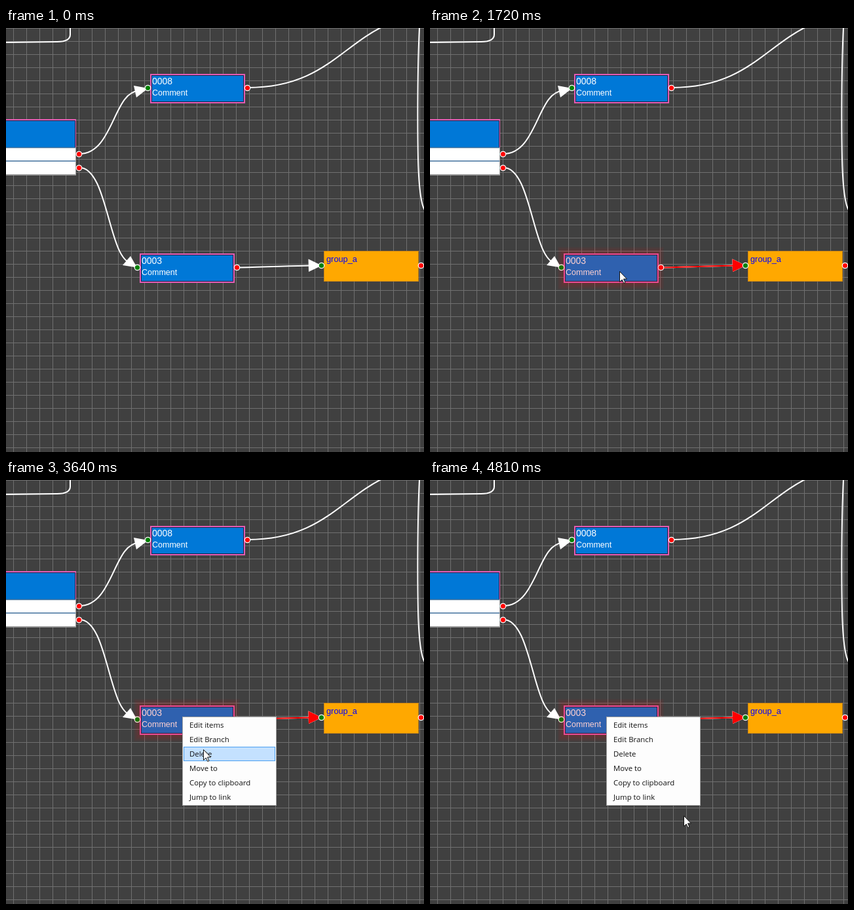
An HTML page that plays this animation: 638x647 px, repeating every 4890 ms.

```html
<!DOCTYPE html>
<html lang="en">
<head>
<meta charset="utf-8">
<title>Node editor context menu</title>
<style>
  html, body { margin: 0; width: 100%; height: 100%; overflow: hidden; background: #404040; }
  svg { display: block; width: 100vw; height: 100vh; }
  text { font-family: "Liberation Sans", sans-serif; font-size: 12.5px; fill: #fff; }
  .id { font-size: 14px; }
  .group { font-size: 12.8px; fill: #00f; }
  .menu text { font-family: "Open Sans", sans-serif; font-size: 11.4px; fill: #111; }
  .wire { fill: none; stroke: #fff; stroke-width: 2; }
  .head { fill: #fff; }
  .in, .out { stroke: #fff; stroke-width: 1.2; }
  .in { fill: #008000; }
  .out { fill: #f00; }
  .glow rect { fill: #f00; fill-opacity: .04; }
  .red .wire { stroke: #f00; }
  .red .head { fill: #f00; }

  .anim { animation: 4890ms step-end infinite; }
  .selection { animation-name: selection; }
  .menu { animation-name: menu; }
  .click { animation-name: click; }
  .hover { animation-name: hover; }
  .cursor { animation-name: cursor; }

  @keyframes selection { 0% { opacity: 0 } 35.17%, 100% { opacity: 1 } }
  @keyframes menu { 0% { opacity: 0 } 46.21%, 100% { opacity: 1 } }
  @keyframes click { 0% { opacity: 0 } 33.33% { opacity: 1 } 35.17%, 100% { opacity: 0 } }
  @keyframes hover {
    0%     { opacity: 0; transform: translate(0, 0) }
    71.16% { opacity: 1; transform: translate(0, 0) }
    72.8%  { opacity: 1; transform: translate(0, 22px) }
    74.43% { opacity: 1; transform: translate(0, 44px) }
    77.7%  { opacity: 1; transform: translate(0, 66px) }
    79.34% { opacity: 1; transform: translate(0, 88px) }
    84.04% { opacity: 1; transform: translate(0, 110px) }
    93.45%, 100% { opacity: 0; transform: translate(0, 110px) }
  }
  @keyframes cursor {
    0%     { transform: translate(-40px, -40px) }
    6.54%  { transform: translate(418px, 594px) }
    8.17%  { transform: translate(365px, 538px) }
    9.81%  { transform: translate(321px, 487px) }
    11.24% { transform: translate(291px, 448px) }
    12.67% { transform: translate(271px, 417px) }
    14.31% { transform: translate(267px, 393px) }
    16.15% { transform: translate(289px, 372px) }
    17.38% { transform: translate(289px, 371px) }
    71.16% { transform: translate(291px, 383px) }
    72.8%  { transform: translate(296px, 397px) }
    74.43% { transform: translate(301px, 411px) }
    76.07% { transform: translate(305px, 425px) }
    77.7%  { transform: translate(309px, 439px) }
    79.34% { transform: translate(314px, 454px) }
    80.98% { transform: translate(319px, 467px) }
    82.2%  { transform: translate(322px, 471px) }
    84.04% { transform: translate(326px, 475px) }
    85.68% { transform: translate(330px, 478px) }
    87.11% { transform: translate(334px, 481px) }
    88.75% { transform: translate(339px, 485px) }
    90.18% { transform: translate(344px, 489px) }
    91.82% { transform: translate(351px, 493px) }
    93.45% { transform: translate(360px, 498px) }
    95.09% { transform: translate(370px, 503px) }
    96.72% { transform: translate(379px, 508px) }
    98.36%, 100% { transform: translate(387px, 512px) }
  }
</style>
</head>
<body>
<svg viewBox="0 0 638 647" preserveAspectRatio="none">
  <defs>
    <pattern id="grid" x="11" width="20" height="20" patternUnits="userSpaceOnUse">
      <path d="M0 0H20V1H1V20H0Z" fill="#707070"/>
    </pattern>
    <g id="node">
      <rect x="1" y="1" width="143" height="43" fill="#0078d7" stroke="#e45cb4" stroke-width="2"/>
      <rect x="2.5" y="2.5" width="140" height="40" fill="none" stroke="#10284c"/>
      <text x="3" y="33">Comment</text>
    </g>
    <g id="link">
      <path class="wire" d="M356 365.5C400 365 430 363 466 362.5"/>
      <path class="head" d="M461.500 352.500L482 362.500L462 372Z"/>
    </g>
  </defs>

  <rect width="638" height="647" fill="#404040"/>
  <rect width="638" height="647" fill="url(#grid)"/>

  <g>
    <rect x="-5" y="139" width="112" height="86" fill="#a0a0a0"/>
    <path d="M0 140H106V182" fill="none" stroke="#e45cb4" stroke-width="2"/>
    <rect y="141" width="105" height="41" fill="#0078d7"/>
    <path d="M0 141.500H105.500V182" fill="none" stroke="#10284c"/>
    <rect y="183" width="106" height="40" fill="#fff"/>
    <path d="M0 182.500H106M0 203H106" stroke="#3f6f9c" stroke-width="1.500"/>
  </g>

  <use href="#node" x="220" y="70"/>
  <text class="id" x="223" y="86">0008</text>
  <use href="#node" x="204" y="344"/>
  <text class="id" x="207" y="360">0003</text>
  <rect x="485.500" y="340.500" width="144" height="46" fill="#ffa800" stroke="#c98418"/>
  <text class="group" x="489" y="357">group_a</text>

  <path class="wire" d="M0 22L78 21Q98 21 98 10V0"/>
  <path class="wire" d="M112 192C164 192 164 96 203 96"/>
  <path class="wire" d="M112 213C156 213 156 354 192 359"/>
  <path class="wire" d="M369 91C520 91 520 -23 671 -23"/>
  <path class="wire" d="M631 0C628 60 628 150 629 200C630 240 633 268 639 278"/>
  <path class="head" d="M195 88L217 92L199 106Z"/>
  <path class="head" d="M190 348L200 365.500L178 362Z"/>
  <use href="#link"/>
  <g class="anim selection red"><use href="#link" class="red"/>
    <path d="M356 365.500C400 365 430 363 466 362.500" fill="none" stroke="#f00" stroke-width="2"/>
    <path d="M461.500 352.500L482 362.500L462 372Z" fill="#f00"/>
  </g>

  <circle class="in" cx="216.500" cy="91.500" r="4.200"/>
  <circle class="out" cx="368.500" cy="91.500" r="4.200"/>
  <circle class="out" cx="111.500" cy="192.500" r="4.200"/>
  <circle class="out" cx="111.500" cy="213.500" r="4.200"/>
  <circle class="in" cx="200.500" cy="365.500" r="4.200"/>
  <circle class="out" cx="352.500" cy="365.500" r="4.200"/>
  <circle class="in" cx="481.500" cy="362.500" r="4.200"/>
  <circle class="out" cx="633.500" cy="362.500" r="4.200"/>

  <g class="anim selection glow">
    <rect x="195" y="334" width="162" height="65"/>
    <rect x="197" y="336" width="158" height="61"/>
    <rect x="199" y="338" width="154" height="57"/>
    <rect x="201" y="340" width="150" height="53"/>
    <rect x="203" y="342" width="146" height="49"/>
  </g>

  <g class="anim menu">
    <rect x="269.500" y="361.500" width="143" height="135" fill="#fdfdfd" stroke="#a0a0a0"/>
    <rect class="anim hover" x="271.500" y="363.500" width="139" height="21" fill="#c4e1ff" stroke="#4ba0f0"/>
    <text x="280" y="378">Edit items</text>
    <text x="280" y="400">Edit Branch</text>
    <text x="280" y="422">Delete</text>
    <text x="280" y="444">Move to</text>
    <text x="280" y="466">Copy to clipboard</text>
    <text x="280" y="488">Jump to link</text>
  </g>

  <path class="anim cursor" d="M.5 .5V16.500L4.200 13L6.800 18.500L9 17.500L6.500 12H11.500Z" fill="#fff" stroke="#111"/>
  <circle class="anim click" cx="289" cy="371" r="12" fill="#fff000" fill-opacity=".5"/>
</svg>
</body>
</html>
```
